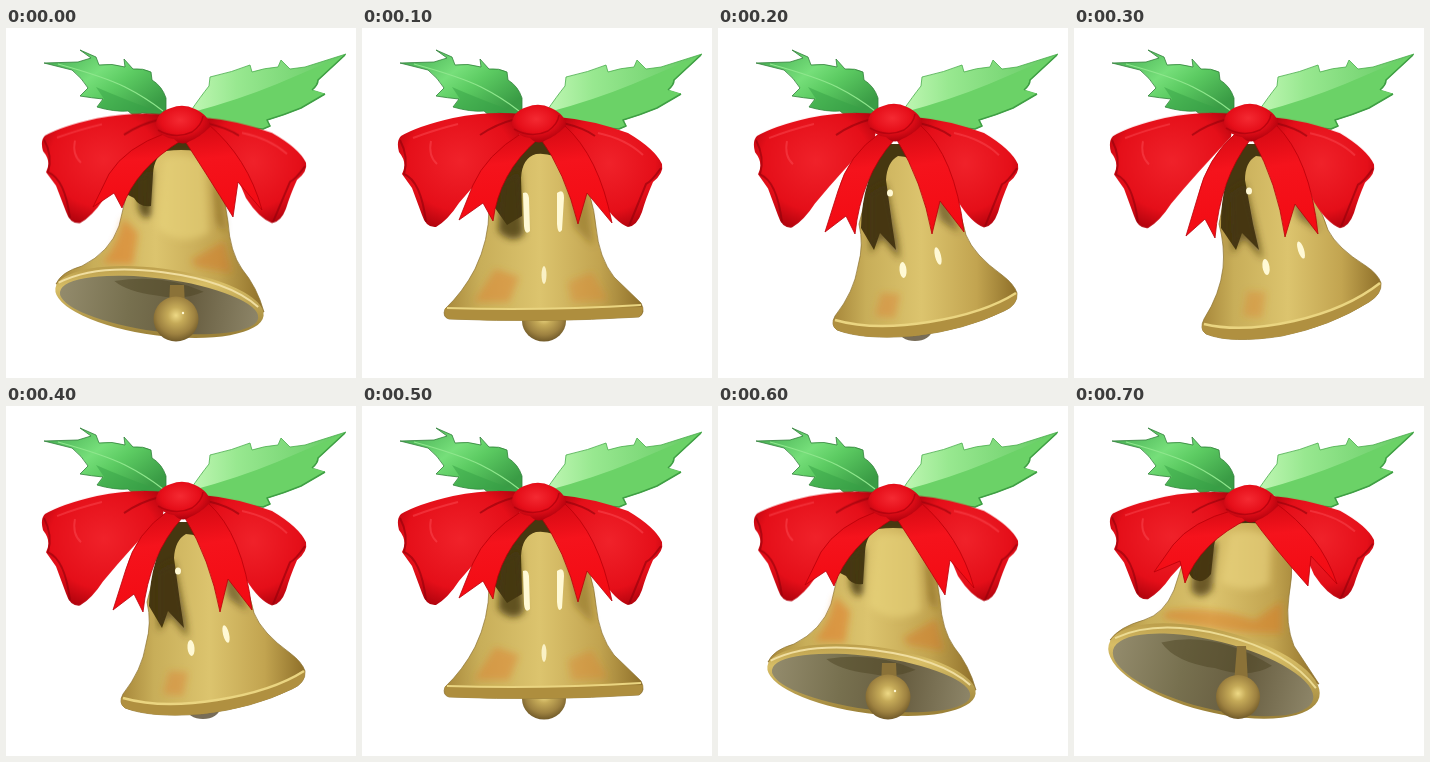
Write an HTML page that moves like this. It is 350 by 350 pixels and loops after 800 ms.

```html
<!DOCTYPE html>
<html lang="en">
<head>
<meta charset="utf-8">
<title>Swinging bell</title>
<style>
html, body { margin: 0; width: 100%; height: 100%; overflow: hidden; background: #fff; }
svg { display: block; width: 100vw; height: 100vh; }
.pose { visibility: hidden; animation: 800ms step-end infinite; }
.far-left { animation-name: far-left; }
.left { animation-name: left; }
.mid { animation-name: mid; }
.right { animation-name: right; }
.far-right { animation-name: far-right; }
.loops { transform-origin: 0 100px; animation: squash 800ms step-end infinite; }
.knot { animation: nod 800ms step-end infinite; }
.soft { filter: url(#blur); }
.gold { fill: url(#gold); stroke: #8c7232; stroke-width: .7; }
.shade { fill: #463710; }
.tail { fill: url(#tail); stroke: #b8000a; stroke-width: .8; stroke-linejoin: round; }
.shine { fill: #fff9d5; }
@keyframes far-left { 0% { visibility: hidden } 87.5%, 100% { visibility: visible } }
@keyframes left {
  0%, 75% { visibility: visible }
  12.5%, 87.5%, 100% { visibility: hidden }
}
@keyframes mid {
  0%, 25%, 75%, 100% { visibility: hidden }
  12.5%, 62.5% { visibility: visible }
}
@keyframes right {
  0%, 37.5%, 62.5%, 100% { visibility: hidden }
  25%, 50% { visibility: visible }
}
@keyframes far-right {
  0%, 50%, 100% { visibility: hidden }
  37.5% { visibility: visible }
}
@keyframes squash {
  0%, 75% { transform: scaleY(.96) }
  12.5%, 62.5% { transform: none }
  25%, 50% { transform: scaleY(1.005) }
  37.5% { transform: scaleY(1.01) }
  87.5%, 100% { transform: scaleY(.94) }
}
@keyframes nod {
  0%, 75% { transform: translateY(1px) }
  12.5%, 62.5% { transform: none }
  25% { transform: translateY(-1px) }
  87.5%, 100% { transform: translateY(2px) }
}
</style>
</head>
<body>
<svg viewBox="0 0 350 350">
<defs>
  <filter id="blur" x="-60%" y="-60%" width="220%" height="220%"><feGaussianBlur stdDeviation="3.5"/></filter>
  <linearGradient id="gold">
    <stop offset="0" stop-color="#a7873a"/><stop offset=".18" stop-color="#c8ae59"/>
    <stop offset=".48" stop-color="#dcc46e"/><stop offset=".78" stop-color="#c2a450"/>
    <stop offset="1" stop-color="#8e6f29"/>
  </linearGradient>
  <linearGradient id="lip" x2=".5" y2="1">
    <stop offset="0" stop-color="#a8893a"/><stop offset=".4" stop-color="#d8be66"/><stop offset="1" stop-color="#9c8239"/>
  </linearGradient>
  <linearGradient id="inside">
    <stop offset="0" stop-color="#938b6c"/><stop offset=".35" stop-color="#77704f"/>
    <stop offset=".65" stop-color="#675d40"/><stop offset="1" stop-color="#8d8568"/>
  </linearGradient>
  <radialGradient id="ball" cx=".5" cy=".42" r=".6">
    <stop offset="0" stop-color="#eed985"/><stop offset=".3" stop-color="#c5aa58"/>
    <stop offset=".7" stop-color="#9d8140"/><stop offset="1" stop-color="#6c5627"/>
  </radialGradient>
  <linearGradient id="tail" x2=".1" y2="1">
    <stop offset="0" stop-color="#d20812"/><stop offset=".4" stop-color="#f5131c"/><stop offset="1" stop-color="#f30b13"/>
  </linearGradient>
  <radialGradient id="loop" cx=".5" cy=".42" r=".62">
    <stop offset="0" stop-color="#f0222a"/><stop offset=".7" stop-color="#e50f19"/><stop offset="1" stop-color="#b0030d"/>
  </radialGradient>
  <radialGradient id="bead" cx=".45" cy=".38" r=".65">
    <stop offset="0" stop-color="#f42a32"/><stop offset=".55" stop-color="#e60e19"/><stop offset="1" stop-color="#a8000b"/>
  </radialGradient>
  <linearGradient id="leafL" x2="1" y2=".7">
    <stop offset="0" stop-color="#3ea54c"/><stop offset=".45" stop-color="#76df7a"/>
    <stop offset=".65" stop-color="#5ccb62"/><stop offset="1" stop-color="#3a9c45"/>
  </linearGradient>
  <linearGradient id="leafR" x2="1" y2="0">
    <stop offset="0" stop-color="#c0f7b4"/><stop offset=".3" stop-color="#98e890"/><stop offset="1" stop-color="#63c962"/>
  </linearGradient>
</defs>

<rect width="350" height="350" fill="#fff"/>

<g stroke-linejoin="round">
  <path fill="url(#leafL)" stroke="#31803a" stroke-width=".8" d="M38 35L72 34L85 30L74 22L90 29L93 37Q106 35 119 39L118 31L127 41Q137 40 145 44L146 52Q156 58 160 70L160 88Q148 86 136 85L128 88L122 83Q108 84 91 79L97 71Q86 70 74 68L82 60Q76 50 66 42Z"/>
  <path fill="#37a246" d="M90 59Q115 70 158 86Q133 83 122 83Q108 84 92 79L98 71Z" opacity=".5"/>
  <path fill="none" stroke="#8fe78d" stroke-width="1.2" d="M52 36Q99 49 119 59T157 83"/>
  <path fill="url(#leafR)" stroke="#49ad4c" stroke-width=".8" d="M340 26L299 39L284 41L275 32L272 39Q258 40 246 44L244 37Q227 44 204 49L203 58Q195 68 184 84L192 90Q210 92 222 98L257 101L264 98L261 92Q278 87 295 80L319 66L306 62Q312 57 312 52Z"/>
  <path fill="#6bd267" d="M187 84Q232 72 271 56L339 27L312 52L306 62L319 66L295 80Q278 87 261 92L264 98L257 101L222 98Q205 92 187 84Z"/>
  <path fill="none" stroke="#3f9f44" stroke-width="1.6" d="M222 98L257 101L264 98L261 92Q278 87 295 80L319 66M306 62Q312 57 312 52L339 27"/>
</g>

<!-- bells, one per pose -->
<g class="pose far-left">
  <path class="gold" d="M139 125Q173 100 212 125Q222 150 215 190Q211 218 220 240L245 278L140 262L36 234Q45 221 70 214Q90 208 100 184L110 153Z"/>
  <path class="shade" d="M110 160Q140 115 174 108Q200 108 208 122Q185 115 158 118Q142 124 140 140L137 168Q128 180 118 172Z"/>
  <g class="soft">
    <path class="shade" d="M122 142L143 135L138 184Q126 196 117 184Z" opacity=".75"/>
    <path fill="#d97925" d="M93 205Q137 199 181 214L208 195L208 227Q150 229 88 212Z" opacity=".5"/>
    <path fill="#ecd680" d="M155 128Q174 120 197 130L195 178Q171 189 147 176Z" opacity=".6"/>
  </g>
  <g transform="rotate(14 140 265)">
    <ellipse cx="140" cy="265" rx="108.5" ry="41" fill="url(#lip)"/>
    <ellipse cx="140" cy="269" rx="103" ry="34" fill="url(#inside)"/>
    <path fill="#4a4020" d="M82 250Q131 225 195 246Q176 265 140 262Q100 266 82 250Z" opacity=".45"/>
    <path fill="none" stroke="#ecdb93" stroke-width="2" d="M36 257Q72 228 140 228T243 257"/>
  </g>
  <path fill="#8b7238" d="M163 240L172 240L174 277L160 277Z"/>
  <circle cx="164" cy="291" r="22" fill="url(#ball)"/>
</g>

<g class="pose left">
  <path class="gold" d="M144 131Q172 104 207 128Q217 158 222 194Q224 224 236 241Q251 259 258 284L153 266L50 256Q55 244 76 238Q104 224 113 198Q119 174 123 153Z"/>
  <path class="shade" d="M118 165Q140 123 172 112Q198 112 205 126Q183 120 160 123Q148 128 147 146L145 178Q134 180 128 170Z"/>
  <g class="soft">
    <path class="shade" d="M132 150L147 140L145 187Q138 196 132 180Z" opacity=".8"/>
    <path fill="#df812c" d="M117 190L132 205L127 237L96 235Q111 219 117 190Z" opacity=".6"/>
    <path fill="#d57423" d="M185 232L218 213L226 245L190 239Z" opacity=".45"/>
    <path fill="#ecd77f" d="M157 131Q178 122 199 133L203 205Q175 220 151 200Z" opacity=".55"/>
    <path fill="#80601c" d="M207 150L215 165L219 205L211 195Z" opacity=".6"/>
  </g>
  <g transform="rotate(7.5 153.5 274)">
    <ellipse cx="153.5" cy="274" rx="105" ry="33.5" fill="url(#lip)"/>
    <ellipse cx="153.5" cy="277" rx="100" ry="26.5" fill="url(#inside)"/>
    <path fill="#4a4020" d="M106 259Q153 245 196 258Q176 270 150 268Q120 268 106 259Z" opacity=".45"/>
    <path fill="none" stroke="#f0dea0" stroke-width="2" d="M51 268Q86 244 153 244T252 266"/>
  </g>
  <path fill="#8b7238" d="M164 257L178 257L179 279L163 279Z"/>
  <circle cx="170" cy="291" r="22.5" fill="url(#ball)"/>
  <circle class="shine" cx="177" cy="285" r="1.2"/>
</g>

<g class="pose mid">
  <ellipse cx="182" cy="293" rx="22" ry="20.5" fill="url(#ball)"/>
  <path class="gold" d="M148 141Q180 95 214 138Q231 165 234 199Q237 230 252 249L279 275Q284 285 277 289Q182 295 87 291Q80 289 83 281Q101 264 113 241Q127 212 127 181Z"/>
  <path class="shade" d="M133 180Q140 138 168 112L190 112L206 136Q190 124 174 126Q160 130 159 150L160 188L145 197Z"/>
  <path fill="#ae8e3e" d="M83 280Q182 282 281 279Q281 286 277 289Q182 295 87 291Q82 289 83 280Z"/>
  <path fill="none" stroke="#ead581" stroke-width="2" d="M85 280Q181 283 279 277"/>
  <g class="soft">
    <path class="shade" d="M140 155L157 142L162 206Q151 218 136 203Z" opacity=".8"/>
    <path fill="#dd8333" d="M133 241L157 249L147 274L112 274Z" opacity=".5"/>
    <path fill="#dd8333" d="M206 254L230 244L246 272L210 274Z" opacity=".4"/>
    <path fill="#7c5d1b" d="M204 140L225 157L231 218L212 199Z" opacity=".45"/>
  </g>
  <path class="shine" d="M161 165Q166 163 167 170L168 203Q163 208 162 198ZM195 165Q202 160 202 170L200 202Q196 208 195 196Z"/>
  <ellipse class="shine" cx="182" cy="247" rx="2.5" ry="9" opacity=".85"/>
</g>

<g class="pose right">
  <ellipse cx="197" cy="302" rx="17" ry="11" fill="#786d58"/>
  <path class="gold" d="M155 142Q178 98 212 140Q242 173 248 207Q256 227 284 247Q296 256 299 265Q300 277 286 283Q247 302 196 308Q145 312 119 302Q112 297 117 288Q136 264 140 238Q146 217 141 196Z"/>
  <path class="shade" d="M143 200Q144 150 169 116L190 116L204 140Q193 128 180 128Q169 134 168 152L174 196L178 222L162 205L156 222Z"/>
  <path fill="#b09040" d="M116 291Q151 303 211 294Q265 285 299 264Q300 277 286 283Q247 302 196 308Q145 312 119 302Q113 298 116 291Z"/>
  <path fill="none" stroke="#ead581" stroke-width="2.5" d="M117 292Q155 303 211 294T298 265"/>
  <g class="soft">
    <path class="shade" d="M152 165L168 155L180 212L182 232L164 210L152 226Z" opacity=".65"/>
    <path fill="#dc8131" d="M163 265L182 266L177 290L157 288Z" opacity=".45"/>
    <path class="shade" d="M214 163L230 172L241 205L222 192Z" opacity=".55"/>
  </g>
  <ellipse class="shine" cx="172" cy="165" rx="3" ry="3.5"/>
  <ellipse class="shine" cx="185" cy="242" rx="3.5" ry="8" transform="rotate(-5 185 242)"/>
  <ellipse class="shine" cx="220" cy="228" rx="3" ry="9" transform="rotate(-14 220 228)"/>
</g>

<g class="pose far-right">
  <path class="gold" d="M156 142Q179 98 213 140Q246 172 254 202Q263 220 292 238Q304 246 307 255Q308 266 295 274Q257 298 208 308Q157 316 132 306Q125 301 130 291Q146 266 149 240Q151 218 145 196Z"/>
  <path class="shade" d="M147 200Q146 150 170 116L190 116L206 140Q195 128 182 128Q171 134 171 152L179 196L185 222L168 205L162 222Z"/>
  <path fill="#b09040" d="M129 295Q163 305 220 293Q273 280 307 254Q308 266 295 274Q257 298 208 308Q157 316 132 306Q126 302 129 295Z"/>
  <path fill="none" stroke="#ead581" stroke-width="2.5" d="M130 296Q167 305 220 293T306 255"/>
  <g class="soft">
    <path class="shade" d="M156 165L171 155L185 212L189 232L170 210L158 226Z" opacity=".65"/>
    <path fill="#dc8131" d="M173 263L192 264L188 290L169 288Z" opacity=".4"/>
    <path class="shade" d="M215 163L233 172L245 203L224 190Z" opacity=".55"/>
  </g>
  <ellipse class="shine" cx="175" cy="163" rx="3" ry="3.5"/>
  <ellipse class="shine" cx="192" cy="239" rx="3.5" ry="8" transform="rotate(-9 192 239)"/>
  <ellipse class="shine" cx="227" cy="222" rx="3" ry="9" transform="rotate(-18 227 222)"/>
</g>

<!-- bow -->
<g class="loops">
  <path fill="url(#loop)" d="M160 86Q126 83 91 90Q56 98 39 108Q34 113 37 124Q46 135 40 146L50 160L60 187Q64 200 74 199Q86 192 97 175Q124 143 157 109Z"/>
  <path fill="url(#loop)" d="M196 89Q231 92 266 105Q293 121 300 136Q302 145 291 154Q284 170 280 184Q275 198 266 199Q253 194 240 173Q222 126 194 108Z"/>
  <path fill="none" stroke="#8f000a" stroke-width="2" opacity=".6" d="M38 112Q47 129 42 146Q59 153 64 194M299 140Q289 154 284 156Q276 176 267 198M154 91Q134 96 118 107M201 95Q222 100 233 108"/>
  <path fill="none" stroke="#ff5960" stroke-width="2" opacity=".4" d="M51 110Q72 102 96 96M69 113Q66 128 75 136M236 105Q264 111 281 127"/>
</g>
<g class="pose far-left">
  <path class="tail" d="M160 104Q118 115 99 139L80 166L106 155L111 177Q126 136 176 112Z"/>
  <path class="tail" d="M176 109Q199 141 234 180L237 150L263 178Q247 129 200 96Z"/>
</g>
<g class="pose left">
  <path class="tail" d="M160 105Q120 119 103 146L87 179L108 165L116 180Q130 140 176 112Z"/>
  <path class="tail" d="M177 110Q200 145 227 189L232 154L256 182Q242 130 202 96Z"/>
</g>
<g class="pose mid">
  <path class="tail" d="M160 105Q124 127 111 157L97 192L121 175L131 193Q137 145 175 112Z"/>
  <path class="tail" d="M178 110Q203 144 216 196L225 165L250 195Q237 128 202 97Z"/>
</g>
<g class="pose right">
  <path class="tail" d="M162 105Q130 127 120 163L107 204L128 188L137 206Q143 149 176 112Z"/>
  <path class="tail" d="M179 112Q204 153 214 206L222 173L246 204Q237 128 202 97Z"/>
</g>
<g class="pose far-right">
  <path class="tail" d="M162 105Q133 130 124 168L112 208L131 191L141 210Q146 151 176 112Z"/>
  <path class="tail" d="M179 112Q203 154 211 209L221 176L244 206Q236 130 202 97Z"/>
</g>
<g class="knot">
  <path fill="url(#bead)" d="M150 98Q149 84 165 79Q177 74 189 80Q204 87 204 98Q194 108 184 112Q176 118 168 110Q154 108 150 98Z"/>
  <path fill="none" stroke="#aa000c" stroke-width="1.5" opacity=".7" d="M152 101Q169 111 186 103Q196 96 197 87"/>
</g>
</svg>
</body>
</html>
```
